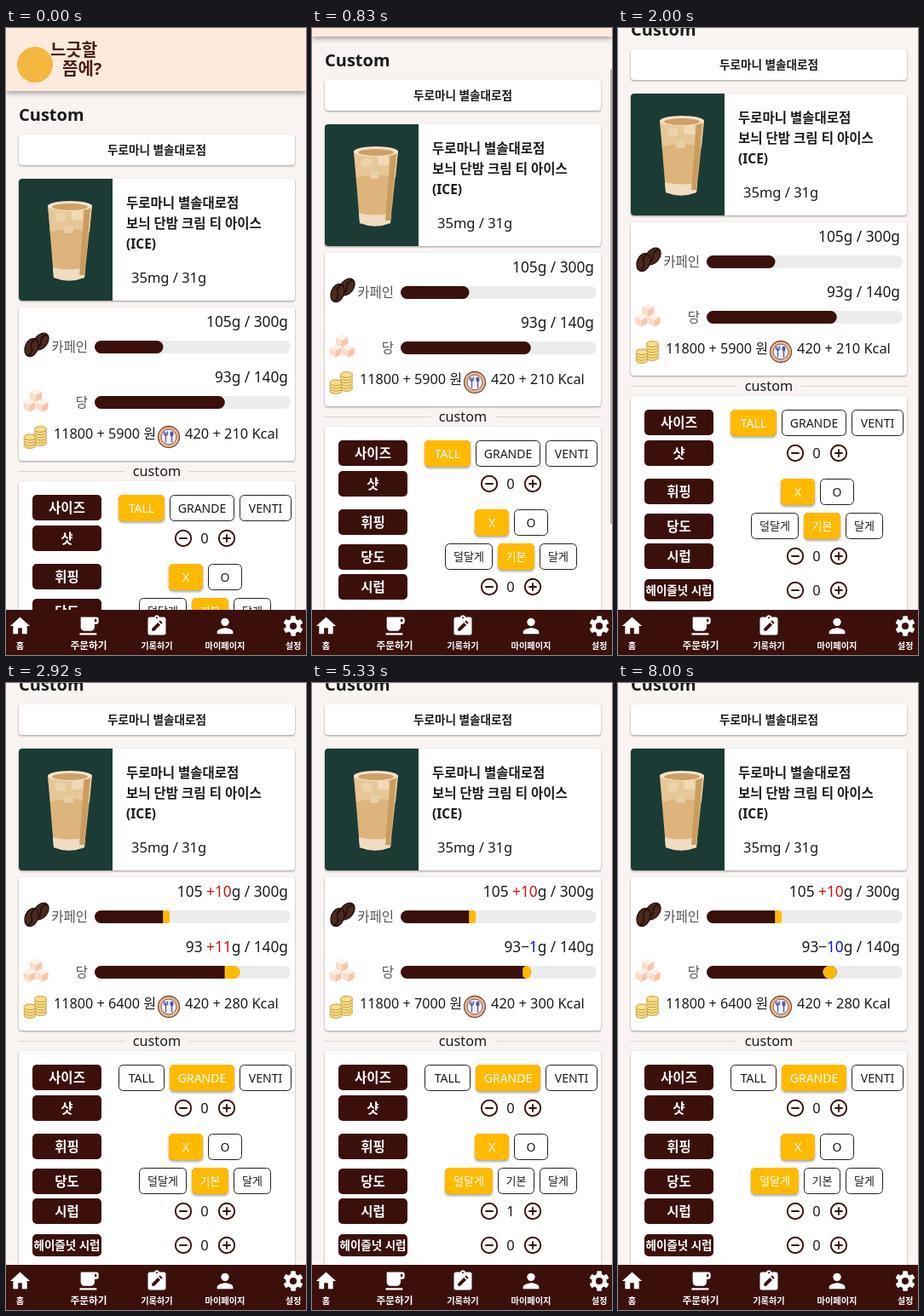
Write an HTML page that moves like this. It is 352x736 px and loops after 8.51 s.

```html
<!DOCTYPE html>
<html lang="ko">
<head>
<meta charset="utf-8">
<title>Custom order</title>
<style>
  html, body { margin: 0; width: 100%; height: 100%; overflow: hidden; background: #f9f4f2; }
  svg { display: block; width: 352px; height: 736px; }
  text { font-family: 'Noto Sans', 'Noto Sans CJK KR', sans-serif; white-space: pre; }
  .card { fill: #fff; filter: drop-shadow(0 1px 1.2px rgba(0, 0, 0, .38)); }
  .raised { filter: drop-shadow(0 2px 1.5px rgba(0, 0, 0, .35)); }
  .top { filter: drop-shadow(0 2px 3px rgba(0, 0, 0, .4)); }
</style>
</head>
<body>
<svg id="stage" viewBox="0 0 352 736" xmlns="http://www.w3.org/2000/svg"></svg>
<script>
const LOOP = 8510, FPS = 12;
const DARK = '#3b100b', GOLD = '#ffba00', INK = '#1b1b1b';
const BAR = { x: 104, w: 230, h: 15 };

const rect = (x, y, w, h, fill, r = 0, extra = '') =>
  `<rect x="${x}" y="${y}" width="${w}" height="${h}" rx="${r}" fill="${fill}" ${extra}/>`;
const circle = (x, y, r, fill, extra = '') =>
  `<circle cx="${x}" cy="${y}" r="${r}" fill="${fill}" ${extra}/>`;
const ellipse = (x, y, rx, ry, fill, extra = '') =>
  `<ellipse cx="${x}" cy="${y}" rx="${rx}" ry="${ry}" fill="${fill}" ${extra}/>`;
const path = (d, fill, extra = '') => `<path d="${d}" fill="${fill}" ${extra}/>`;
const line = (d, color, w) =>
  path(d, 'none', `stroke="${color}" stroke-width="${w}" stroke-linecap="round"`);
const text = (x, y, size, str, { fill = INK, weight = 400, anchor = 'start', id = '' } = {}) =>
  `<text x="${x}" y="${y}" font-size="${size}" fill="${fill}" font-weight="${weight}" text-anchor="${anchor}" id="${id}">${str}</text>`;
const card = (y, h) => rect(15, y, 324, h, '#fff', 4, 'class="card"');

function header() {
  const logo = { weight: 700, fill: '#4a1f14' };
  return rect(0, -10, 352, 84, '#feeadc', 0, 'class="top"') +
    circle(34, 43, 21, '#f4b63f') +
    text(52, 33, 20, '느긋할', logo) + text(66, 55, 20, '쯤에?', logo);
}

function drink() {
  return path('M19 177H125V320H19Q15 320 15 316V181Q15 177 19 177Z', '#1b3b34') +
    path('M49 208L56 293Q74 300 92 293L101 208Z', '#dcb47c') +
    path('M55 281L56 293Q74 300 92 293L93 281Q74 286 55 281Z', '#f0dcc0') +
    path('M49 208L52 240Q75 232 98 240L101 208Z', '#e6c798') +
    path('M92 210L86 290L92 290L99 210Z', '#c99d62') +
    ellipse(75, 209, 26, 6, '#f1e3cb') + ellipse(75, 210, 21, 4, '#cfa067') +
    rect(58, 217, 12, 10, '#ecd3ab', 3) + rect(77, 214, 13, 11, '#efd9b6', 3) +
    rect(68, 232, 11, 9, '#e9cea2', 3);
}

function beans() {
  const bean = (x, y, a) => `<g transform="translate(${x} ${y}) rotate(${a})">` +
    ellipse(0, 0, 7.5, 11, '#4b2a1d', 'stroke="#22110c" stroke-width="1.4"') +
    line('M0 -10Q-4 -4 0 0T0 10', '#1f0f0a', 1.6) + '</g>';
  return bean(41, 368, 38) + bean(30, 375, 22);
}

function cubes() {
  const cube = (x, y) =>
    path(`M${x} ${y - 8}l7 4l-7 4l-7 -4Z`, '#fff1e7') +
    path(`M${x - 7} ${y - 4}l7 4v8l-7 -4Z`, '#fbdcc9') +
    path(`M${x + 7} ${y - 4}l-7 4v8l7 -4Z`, '#f6c6ab');
  return cube(35, 431) + cube(27.5, 443) + cube(42.5, 443);
}

function coins() {
  const stack = (x, y, n) => Array.from({ length: n }, (_, i) =>
    ellipse(x, y - i * 3.2, 7, 3.4, '#f8e08c', 'stroke="#c49a3c" stroke-width="1"')).join('');
  return stack(40.5, 487, 6) + stack(28, 490, 4);
}

function plate() {
  return circle(191, 480, 12.5, '#e9bd94', 'stroke="#7b4738" stroke-width="1.3"') +
    circle(191, 480, 9, '#eef0fb', 'stroke="#8a5a4a" stroke-width="1"') +
    line('M187.5 475v11M185.5 474v3q2 2 4 0v-3', '#5557a6', 1.3) +
    line('M194.5 478v8', '#5557a6', 1.4) + ellipse(194.5, 476.5, 2, 3, '#5557a6');
}

const chips = [];
function chip(group, name, x, w, y, size) {
  const id = 'chip' + chips.length, mid = x + w / 2, base = y + 15.5 + size * .36;
  chips.push({ group, name, id });
  return rect(x + .5, y + .5, w - 1, 30, '#fff', 5, 'stroke="#222" stroke-width="1"') +
    text(mid, base, size, name, { anchor: 'middle' }) +
    `<g id="${id}">` + rect(x, y, w, 31, GOLD, 5, 'class="raised"') +
    text(mid, base, size, name, { anchor: 'middle', fill: '#fff', weight: 500 }) + '</g>';
}

function label(y, str, h = 30, size = 15.5) {
  return rect(31, y, 81, h, DARK, 5) +
    text(71.5, y + h / 2 + size * .36, size, str, { fill: '#fff', weight: 700, anchor: 'middle' });
}

function counter(y, id) {
  const ring = x => circle(x, y, 9.2, 'none', `stroke="${DARK}" stroke-width="1.9"`);
  return ring(208) + ring(259) + line(`M204 ${y}h8M255 ${y}h8M259 ${y - 4}v8`, DARK, 1.9) +
    text(233, y + 6, 16.5, '0', { anchor: 'middle', id });
}

function bar(y, id) {
  return rect(BAR.x, y, BAR.w, BAR.h, '#ececec', 7.5) +
    path('', DARK, `id="${id}Fill"`) + path('', GOLD, `id="${id}Diff"`);
}

function page() {
  const bold = { weight: 700 }, right = { anchor: 'end' };
  const grey = { fill: '#555', anchor: 'end' };
  const store = '두로마니 별솔대로점';
  return header() +
    text(15, 109, 20, 'Custom', bold) +
    card(125, 36) + text(177, 147.5, 13.6, store, { ...bold, anchor: 'middle' }) +
    card(177, 143) + drink() +
    text(141, 210.5, 15.5, store, bold) +
    text(141, 234.5, 15.5, '보늬 단밤 크림 티 아이스', bold) +
    text(141, 258.5, 15.5, '(ICE)', bold) +
    text(147, 299, 16.5, '35mg / 31g') +
    card(328, 180) + beans() + cubes() + coins() + plate() +
    text(331, 351, 17.3, '', { ...right, id: 'cafText' }) +
    text(96, 380, 15.5, '카페인', grey) + bar(367, 'caf') +
    text(331, 416, 17.3, '', { ...right, id: 'sugText' }) +
    text(96, 445, 15.5, '당', grey) + bar(432, 'sug') +
    text(56, 482, 16.2, '', { id: 'price' }) +
    text(210, 482, 16.4, '', { id: 'kcal' }) +
    line('M15 520.5H139M215 520.5H339', '#dad4d1', 1) +
    text(177, 525.5, 16.2, 'custom', { anchor: 'middle' }) +
    card(532, 300) +
    label(548, '사이즈') + label(584, '샷') + label(629, '휘핑') +
    label(670, '당도') + label(705, '시럽') + label(747, '헤이즐넛 시럽', 26, 13.5) +
    chip('size', 'TALL', 132, 54, 548, 14) + chip('size', 'GRANDE', 192, 76, 548, 14) +
    chip('size', 'VENTI', 274, 61, 548, 14) +
    chip('whip', 'X', 191, 40, 629, 14) + chip('whip', 'O', 237, 40, 629, 14) +
    chip('sweet', '덜달게', 156, 56, 669, 13) + chip('sweet', '기본', 218, 43, 669, 13) +
    chip('sweet', '달게', 267, 44, 669, 13) +
    counter(599, 'shot') + counter(720, 'syrup') + counter(760, 'hazel');
}

function nav() {
  const icon = (x, d) => `<g transform="translate(${x - 14} 688) scale(1.167)">${d}</g>`;
  const home = path('M10 20v-6h4v6h5v-8h3L12 3 2 12h3v8z', '#fff');
  const cup = path('M20 3H4v10c0 2.2 1.8 4 4 4h6c2.2 0 4-1.8 4-4v-3h2c1.1 0 2-.9 2-2V5c0-1.1-.9-2-2-2zm0 5h-2V5h2zM3 19h17v2H3z', '#fff');
  const note = rect(3, 3, 18, 18, '#fff', 2) + circle(12, 3.4, 2.4, '#fff') + circle(12, 3.6, .9, DARK) +
    path('M7 17v-2.5l6-6 2.5 2.5-6 6zM14 7.5l1.2-1.2 2.5 2.5-1.2 1.2z', DARK);
  const person = circle(12, 8, 4, '#fff') + path('M12 14c-2.7 0-8 1.3-8 4v2h16v-2c0-2.7-5.3-4-8-4z', '#fff');
  const teeth = [0, 60, 120].map(a =>
    rect(9.5, 2, 5, 20, '#fff', 1, `transform="rotate(${a} 12 12)"`)).join('');
  const gear = teeth + circle(12, 12, 7.4, '#fff') + circle(12, 12, 3.5, DARK);
  const items = [[16.5, '홈', home], [97, '주문하기', cup, 11.7], [177, '기록하기', note],
    [257, '마이페이지', person], [337, '설정', gear]];
  return rect(0, 683, 352, 53, DARK) + items.map(([x, name, d, size = 10.2]) => icon(x, d) +
    text(x, 729, size, name, { fill: '#fff', weight: 700, anchor: 'middle' })).join('');
}

const stage = document.getElementById('stage');
stage.innerHTML = `<g id="page">${page()}</g>` + rect(350, 0, 2, 534, '#b3aeac', 1, 'id="thumb"') + nav();
const $ = id => document.getElementById(id);

// Each entry is the order after a tap at time t.
const first = { t: -1000, size: 'TALL', whip: 'X', sweet: '기본', syrup: 0, caf: 0, sug: 0, price: 5900, kcal: 210 };
const states = [first];
const tap = (t, change) => states.push({ ...states[states.length - 1], t, ...change });
tap(2200, { size: 'GRANDE', caf: 10, sug: 11, price: 6400, kcal: 280 });
tap(3570, { sweet: '덜달게', sug: -10 });
tap(5150, { syrup: 1, sug: -1, price: 7000, kcal: 300 });
tap(6310, { syrup: 0, sug: -10, price: 6400, kcal: 280 });

const clamp = v => Math.min(1, Math.max(0, v));
const mix = (a, b, p) => a + (b - a) * p;

function pill(x0, x1, y, left, right) {
  const w = x1 - x0, h = BAR.h;
  if (w < .1) return '';
  const l = Math.min(left, w / 2), r = Math.min(right, w / 2);
  return `M${x0 + l} ${y}H${x1 - r}a${r} ${r} 0 0 1 ${r} ${r}V${y + h - r}a${r} ${r} 0 0 1 ${-r} ${r}` +
    `H${x0 + l}a${l} ${l} 0 0 1 ${-l} ${-l}V${y + l}a${l} ${l} 0 0 1 ${l} ${-l}Z`;
}

function drawBar(id, y, base, max, diff) {
  const end = BAR.x + BAR.w * base / max, now = end + BAR.w * diff / max;
  const extra = Math.max(0, now - end);
  $(id + 'Fill').setAttribute('d', pill(BAR.x, end, y, 7.5, 7.5 - Math.min(7.5, extra)));
  $(id + 'Diff').setAttribute('d', diff > 0 ? pill(end, now, y, 0, 7.5) : pill(now, end, y, 7.5, 7.5));
}

function setHTML(id, html) {
  const el = $(id);
  if (el.shown !== html) el.innerHTML = el.shown = html;
}

function amount(base, max, diff) {
  const part = diff > 0 ? ` <tspan fill="#c3150f">+${diff}</tspan>`
    : diff < 0 ? `−<tspan fill="#1010d8">${-diff}</tspan>` : '';
  return `${base}${part}g / ${max}g`;
}

function render(ms) {
  const t = Math.floor((ms + 5) * FPS / 1000) * 1000 / FPS;

  const scroll = 100 * (1 - (1 - clamp((t - 600) / 730)) ** 2.65);
  $('page').setAttribute('transform', `translate(0 ${-Math.round(scroll)})`);
  $('thumb').setAttribute('y', 4 + scroll * .69);
  $('thumb').setAttribute('opacity', t < 600 ? 0 : 1 - clamp((t - 1420) / 250));

  let i = states.length - 1;
  while (states[i].t > t) i--;
  const now = states[i], old = states[Math.max(0, i - 1)];
  const fade = clamp((t - now.t) / 250), slide = clamp((t - now.t) / 400);

  for (const { group, name, id } of chips)
    $(id).setAttribute('opacity', mix(+(old[group] === name), +(now[group] === name), fade));
  drawBar('caf', 367, 105, 300, mix(old.caf, now.caf, slide));
  drawBar('sug', 432, 93, 140, mix(old.sug, now.sug, slide));
  setHTML('cafText', amount(105, 300, now.caf));
  setHTML('sugText', amount(93, 140, now.sug));
  setHTML('price', `11800 + ${now.price} 원`);
  setHTML('kcal', `420 + ${now.kcal} Kcal`);
  setHTML('syrup', String(now.syrup));
}

const start = performance.now();
function tick() {
  render((performance.now() - start) % LOOP);
  requestAnimationFrame(tick);
}
tick();
</script>
</body>
</html>
```
